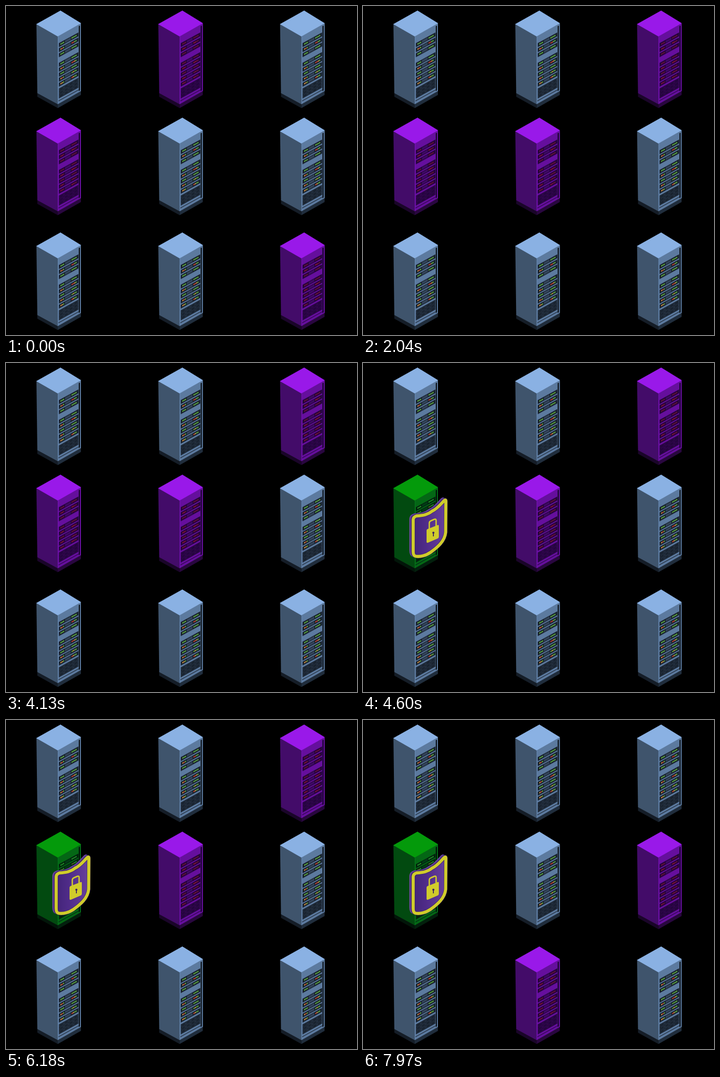
Recreate the animation shown at these times as an HTML page. Size 773 by 725 pixels, loop 8000 ms.

```html
<!DOCTYPE html>
<html lang="en">
<head>
<meta charset="utf-8">
<title>Server racks</title>
<style>
html, body { margin: 0; width: 100%; height: 100%; overflow: hidden; background: #000; }
svg { display: block; width: 773px; height: 725px; }
.rack {
  --top: #8ab1e3; --left: #3f546c; --front: #5c7a9f; --rim: #6485ad;
  --baseL: #151d27; --baseR: #202d3c; --unit: #18212c; --mid: #2c3b4e;
  --line: #465c77; --slot: #0b1118; --g: #69c044; --r: #e24531; --o: #e39a43;
}
.rack.hacked {
  --top: #9919e9; --left: #430c69; --front: #650f9d; --rim: #7412b2;
  --baseL: #1a0529; --baseR: #29073f; --unit: #24053a; --mid: #38085a;
  --line: #500c7c; --slot: #16032a; --g: #751039; --r: #a01234; --o: #8c1038;
}
.rack.safe {
  --top: #049a0b; --left: #024a10; --front: #046715; --rim: #05751a;
  --baseL: #021509; --baseR: #03200d; --unit: #02220d; --mid: #033415;
  --line: #04501a; --slot: #011207; --g: #27a52b; --r: #5c7b20; --o: #4d9424;
}
</style>
</head>
<body>
<svg id="stage" viewBox="0 0 773 725">
  <defs>
    <linearGradient id="plate">
      <stop offset="0" stop-color="#432479"/>
      <stop offset=".45" stop-color="#512d8b"/>
      <stop offset="1" stop-color="#68409d"/>
    </linearGradient>
    <path id="crest" d="M110.500 345 Q111 339 118 337 C133 336 143 334 152 326.500 C163 322 171 311 179 303 Q182.500 300 182.500 305 L182 373 C180 393 164 406 149 417 C139 424 126 428 115 425.500 Q110.500 424 110.500 415 Z"/>
  </defs>
  <g id="racks"></g>
  <g id="shield" visibility="hidden">
    <use href="#crest" x="-5" y="-2" fill="#67439b" stroke="#67439b" stroke-width="7"/>
    <use href="#crest" x="-2.500" y="-1" fill="#4b2b83" stroke="#4b2b83" stroke-width="7"/>
    <use href="#crest" fill="url(#plate)" stroke="#2d1762" stroke-width="8"/>
    <use href="#crest" fill="none" stroke="#d0cc2b" stroke-width="6.800"/>
    <path d="M146 366 V353 Q146 349 150 347.500 L157 344.500 Q161 343 161 347 V360" fill="none" stroke="#d0cc2b" stroke-width="3"/>
    <path d="M142 366 L165 357 Q167 356.500 167 359 V383 Q167 385.500 165 386.500 L143 396 Q140 397 140 394 V369 Q140 367 142 366 Z" fill="#d0cc2b"/>
    <path d="M155 374 V382" stroke="#39215f" stroke-width="2"/>
    <circle cx="155" cy="374" r="2.300" fill="#39215f"/>
  </g>
</svg>
<script>
const LOOP = 8000;
const SECURED_AT = 4600;
const GUARDED = 3;
const COLUMNS = [0, 268.4, 536.6];
const ROWS = [0, 236, 489];

// Start time, then the racks that are lit purple from that moment.
const STEPS = [
  [0, [1, 3, 8]],
  [150, [3, 7, 8]],
  [960, [3, 5, 7]],
  [2040, [2, 3, 4]],
  [2970, [3, 5, 7]],
  [3350, [1, 3, 8]],
  [4130, [2, 3, 4]],
  [4980, [5, 7]],
  [6120, [2, 4]],
  [7890, [5, 7]]
];

// Centre height of each drive and its left and right lamps.
const DRIVES = [
  [20.5, 'ggg', 'gggg'], [31.7, 'org', 'rrgg'], [42.8, 'ggg', 'gggg'],
  [63.8, 'ggg', 'gggg'], [74.8, 'org', 'rrog'], [85.8, 'ggg', 'gggg'],
  [96.8, 'org', 'gogg'], [107.8, 'oog', 'rogg']
];

const poly = (points, color) => `<polygon points="${points}" fill="var(--${color})"/>`;
const rect = (x, y, w, h, color) =>
  `<rect x="${x}" y="${y}" width="${w}" height="${h}" fill="var(--${color})"/>`;
const lamps = (x, y, colors) =>
  [...colors].map((c, i) => rect(x + i * 2.9, y - 1.4, 2.2, 2.8, c)).join('');

function drive([y, left, right]) {
  return rect(2.5, y - 4.3, 43, 8.8, 'unit')
    + rect(16, y - 3.2, 12.5, 6.4, 'mid')
    + rect(16, y - .4, 12.5, .8, 'line')
    + rect(2.5, y + 4.1, 43, .7, 'line')
    + lamps(6, y, left) + lamps(30.5, y, right);
}

function grille() {
  let out = rect(2.5, 116, 43, 22, 'unit');
  for (let row = 0; row < 3; row++) {
    for (let col = 0; col < 4; col++) {
      const x = 3.5 + col * 10.6, y = 117.3 + row * 7;
      out += rect(x, y, 9.4, 5.6, 'mid');
      out += rect(x + 1, y + 1.2, 7.4, 1.2, 'slot') + rect(x + 1, y + 3.4, 7.4, 1.2, 'slot');
    }
  }
  return out;
}

const rackArt =
  poly('69,191 114,216 114,225 69,200', 'baseL')
  + poly('114,216 165,187 165,196 114,225', 'baseR')
  + poly('67,40 114,67 114,216.5 69,192', 'left')
  + poly('114,67 165,38 165,187.500 114,216.500', 'front')
  + poly('120,10 165.500,38 114,67.300 66.500,40', 'top')
  + '<g transform="matrix(1 -.55 0 1 114 67)">'
  + rect(0, 0, 1.6, 149, 'rim') + rect(49, 0, 2, 148, 'rim')
  + rect(46.3, 3, 2.7, 143, 'slot')
  + DRIVES.map(drive).join('') + grille()
  + rect(1.5, 142, 45, 2, 'mid')
  + '</g>';

const holder = document.getElementById('racks');
const shield = document.getElementById('shield');
holder.innerHTML = ROWS.flatMap(y => COLUMNS.map(x =>
  `<g class="rack" transform="translate(${x} ${y})">${rackArt}</g>`)).join('');
const racks = [...holder.children];
let shown = '';

function draw(time) {
  const t = time % LOOP;
  const lit = STEPS.findLast(([start]) => start <= t)[1];
  const secured = t >= SECURED_AT;
  const key = lit + '|' + secured;
  if (key === shown) return;
  shown = key;
  racks.forEach((rack, i) => {
    const state = secured && i === GUARDED ? 'safe' : lit.includes(i) ? 'hacked' : '';
    rack.setAttribute('class', 'rack ' + state);
  });
  shield.setAttribute('visibility', secured ? 'visible' : 'hidden');
}

const origin = performance.now();
function tick() {
  draw(performance.now() - origin);
  requestAnimationFrame(tick);
}
tick();
</script>
</body>
</html>
```
